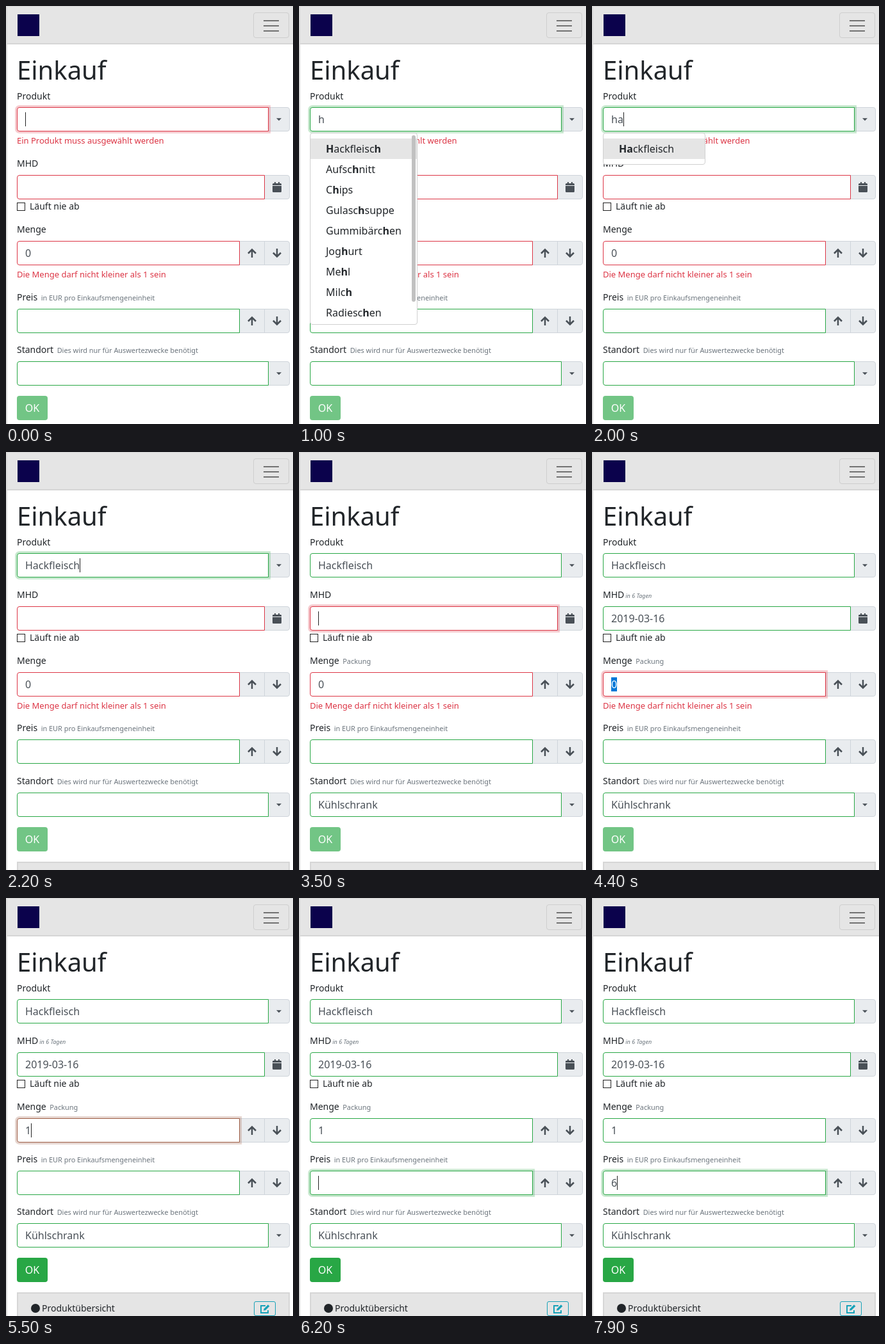
Recreate the animation shown at these times as an HTML page. Size 448x653 px, loop 8 s.

```html
<!DOCTYPE html>
<html lang="de">
<head>
<meta charset="utf-8">
<title>Einkauf</title>
<style>
  html, body { margin: 0; width: 100%; height: 100%; overflow: hidden; background: #fff; }
  body { position: relative; font: 14px/20px "Noto Sans", sans-serif; color: #212529; }
  div { box-sizing: border-box; }
  nav, nav div, .abs, .row, .row > * { position: absolute; white-space: nowrap; }
  nav { box-sizing: border-box; left: 0; top: 0; width: 448px; height: 60px; background: #e5e5e5;
    border: solid #d6d6d6; border-width: 1px 0 2px; }
  .edge { left: 0; top: 0; width: 2px; height: 653px; background: #dcdcdc; }
  .logo { left: 18px; top: 12px; width: 34px; height: 34px; background: #0b024c; }
  .menu { left: 386px; top: 9px; width: 56px; height: 40px; border: 1px solid #cecece; border-radius: 4px; }
  .menu div { left: 15px; width: 24px; height: 2px; background: #727272; }
  h1 { position: absolute; margin: 0; left: 17px; top: 76px; font: 400 40px/48px "Noto Sans", sans-serif; }
  .row { left: 17px; width: 426px; height: 38px; }
  .label { top: -28px; }
  .hint { font-size: 10.9px; color: #6c757d; margin-left: 5.5px; }
  .hint.days { font-size: 9px; font-style: italic; margin-left: 2px; }
  .field { left: 0; top: 0; height: 38px; padding-left: 12px; display: flex; align-items: center;
    background: #fff; border: 1px solid #28a745; border-radius: 4px 0 0 4px; z-index: 1;
    font-size: 16px; line-height: 22px; color: #495057; }
  .field i { width: 1px; height: 22px; background: #222; }
  .field .selected { background: #0078d7; color: #fff; }
  .addon { top: 0; height: 38px; background: #e9ecef; border: 1px solid #ced4da; }
  .addon:last-of-type { border-radius: 0 4px 4px 0; }
  .addon svg { position: absolute; left: 50%; top: 50%; margin: -8px; }
  .error { top: 42px; font-size: 13px; color: #dc3545; }
  .check { top: 43px; left: 0; width: 13px; height: 13px; border: 1px solid #222; background: #fff; }
  .never { top: 39px; left: 20px; }
  #ok { left: 17px; width: 48px; height: 38px; border-radius: 4px; background: #28a745; color: #fff;
    font-size: 16px; line-height: 38px; text-align: center; }
  #card { left: 17px; width: 426px; height: 80px; background: #e5e5e5; border: 2px solid #d6d6d6; }
  .dot { left: 20px; top: 16px; width: 14px; height: 14px; border-radius: 50%; background: #212529; }
  .edit { left: 368px; top: 12px; width: 34px; height: 23px; border: 1px solid #17a2b8; border-radius: 3px; }
  #list { left: 17px; top: 198px; min-width: 160px; max-height: 300px; padding: 8px 0; overflow: hidden;
    background: #fff; border: 1px solid #d0d0d0; border-radius: 4px; z-index: 5; font-size: 16px; line-height: 32px; }
  #list p { margin: 0; padding: 0 24px; }
  #list p:first-child { background: #e5e5e5; }
  #list b { font-weight: 700; }
  #list .bar { position: absolute; right: 2px; top: 3px; width: 6px; height: 260px; border-radius: 3px; background: #c1c1c1; }
</style>
</head>
<body>
<nav>
  <div class="logo"></div>
  <div class="menu"><div style="top:11px"></div><div style="top:19px"></div><div style="top:27px"></div></div>
</nav>
<div class="abs edge"></div>
<h1>Einkauf</h1>
<div id="form"></div>
<div class="abs" id="ok">OK</div>
<div class="abs" id="card">
  <div class="abs dot"></div>
  <div class="abs" style="left:37px;top:13px">Produktübersicht</div>
  <div class="abs edit"><svg class="abs" style="left:8px;top:3px" width="17" height="16" fill="none" stroke="#17a2b8" stroke-width="2">
    <path d="M9 3H2v11h11v-4"/><path d="M6 10.5l.6-2.8L13 1.3l2.4 2.4L9 10z" fill="#17a2b8" stroke="none"/></svg></div>
</div>
<div class="abs" id="list"></div>

<script>
const $ = id => document.getElementById(id);
const icon = body => `<svg width="16" height="16" fill="none" stroke="#495057" stroke-width="2.5">${body}</svg>`;
const ICONS = {
  caret: icon('<path d="M4 6.2h8l-4 4z" fill="#495057" stroke="none"/>'),
  up: icon('<path d="M8 15V3M2 8.5l6-6 6 6"/>'),
  down: icon('<path d="M8 1v12M2 7.5l6 6 6-6"/>'),
  calendar: icon('<path d="M1 5V3.5Q1 2 2.5 2H4V0h2v2h4V0h2v2h1.5Q15 2 15 3.5V5zM1 6h14v8.500Q15 16 13.500 16h-11Q1 16 1 14.500z" fill="#495057" stroke="none"/>')
};
const small = (text, cls = '') => `<span class="hint ${cls}">${text}</span>`;

// Tops are listed per layout stage: both errors shown, one error, none.
const ROWS = {
  product: { tops: [158, 158, 158], label: 'Produkt', icons: ['caret'], width: 393,
    extra: '<div class="error">Ein Produkt muss ausgewählt werden</div>' },
  date: { tops: [264, 241, 241], label: 'MHD' + small('in 6 Tagen', 'days'), icons: ['calendar'], width: 387,
    extra: '<div class="check"></div><div class="never">Läuft nie ab</div>' },
  amount: { tops: [367, 344, 344], label: 'Menge' + small('Packung'), icons: ['up', 'down'], width: 348,
    extra: '<div class="error">Die Menge darf nicht kleiner als 1 sein</div>' },
  price: { tops: [473, 449, 426], label: 'Preis' + small('in EUR pro Einkaufsmengeneinheit'), icons: ['up', 'down'], width: 348 },
  place: { tops: [555, 532, 508], label: 'Standort' + small('Dies wird nur für Auswertezwecke benötigt'), icons: ['caret'], width: 393 }
};
const OK_TOPS = [609, 586, 562], CARD_TOPS = [664, 640, 616];

for (const [id, row] of Object.entries(ROWS)) {
  const addonWidth = (426 - row.width) / row.icons.length;
  const addons = row.icons.map((name, i) =>
    `<div class="addon" style="left:${row.width - 1 + i * addonWidth}px;width:${addonWidth + 1}px">${ICONS[name]}</div>`).join('');
  // Addons sit in their own layer so that only the last one is rounded.
  $('form').insertAdjacentHTML('beforeend', `<div class="row" id="${id}">
    <span class="label">${row.label}</span>
    <div class="field" style="width:${row.width}px"><span></span><i></i></div>
    <section style="left:0;top:0">${addons.replace(/class="addon" style="/g, 'class="abs addon" style="')}</section>
    ${row.extra || ''}</div>`);
}
$('product').querySelector('.label').style.top = '-27px';

const PRODUCTS = ['Hackfleisch', 'Aufschnitt', 'Chips', 'Gulaschsuppe', 'Gummibärchen', 'Joghurt',
  'Mehl', 'Milch', 'Radieschen', 'Schinken'];

// text: field contents, valid: 0 red to 1 green, glow: focus ring strength.
const START = {
  stage: 0, caret: 'product', query: '', days: false, unit: false, selected: false,
  text: { amount: '0' },
  valid: { product: 0, date: 0, amount: 0, price: 1, place: 1 },
  glow: { product: 1 }
};
const STEPS = [
  [400, { caret: '' }],
  [900, { text: { product: 'h' }, valid: { product: .6 } }],
  [1000, { valid: { product: 1 }, query: 'h' }],
  [1100, { text: { product: 'ha' }, caret: 'product' }],
  [1200, { query: 'ha' }],
  [1500, { caret: '' }],
  [2000, { caret: 'product' }],
  [2200, { text: { product: 'Hackfleisch' }, query: '', stage: 1 }],
  [2500, { caret: 'date', glow: { product: .5, date: .5 }, unit: true, text: { place: 'Kühlschrank' } }],
  [2600, { glow: { product: 0, date: 1 } }],
  [3000, { caret: '' }],
  [3500, { caret: 'date' }],
  [3600, { text: { date: '0' } }],
  [3700, { text: { date: '03' } }],
  [3800, { text: { date: '031' } }],
  [3900, { text: { date: '2019-03-16' }, valid: { date: 1 } }],
  [4100, { days: true }],
  [4200, { caret: '', selected: true, glow: { date: .6, amount: .4 } }],
  [4300, { glow: { date: .1, amount: .9 } }],
  [4400, { glow: { date: 0, amount: 1 } }],
  [5500, { selected: false, text: { amount: '1' }, caret: 'amount', valid: { amount: .35 }, stage: 2 }],
  [5600, { valid: { amount: 1 } }],
  [5800, { caret: '' }],
  [6100, { caret: 'price', glow: { amount: .5, price: .5 } }],
  [6200, { glow: { amount: 0, price: 1 } }],
  [6600, { caret: '' }],
  [7100, { caret: 'price' }],
  [7700, { caret: '' }],
  [7900, { caret: 'price', text: { price: '6' } }]
];

const merge = (state, change) => {
  const next = { ...state, ...change };
  for (const key of ['text', 'valid', 'glow']) next[key] = { ...state[key], ...change[key] };
  return next;
};
const RED = [220, 53, 69], GREEN = [40, 167, 69];
const mix = v => RED.map((c, i) => Math.round(c + (GREEN[i] - c) * v)).join();
const show = (el, on) => { el.style.display = on ? '' : 'none'; };

function drawList(query) {
  show($('list'), query);
  if (!query) return;
  const match = new RegExp(query, 'gi');
  const hits = PRODUCTS.filter(name => name.toLowerCase().includes(query));
  $('list').innerHTML = hits.map(name => `<p>${name.replace(match, '<b>$&</b>')}</p>`).join('') +
    (hits.length > 9 ? '<div class="bar"></div>' : '');
}

function draw(s) {
  for (const [id, row] of Object.entries(ROWS)) {
    const el = $(id), field = el.querySelector('.field'), [text, caret] = field.children;
    const color = mix(s.valid[id]), glow = s.glow[id] || 0;
    el.style.top = row.tops[s.stage] + 'px';
    field.style.borderColor = `rgb(${color})`;
    field.style.boxShadow = glow ? `0 0 0 3px rgba(${color},${.25 * glow})` : 'none';
    text.textContent = s.text[id] || '';
    text.className = id === 'amount' && s.selected ? 'selected' : '';
    show(caret, s.caret === id);
  }
  show($('product').querySelector('.error'), s.stage < 1);
  show($('amount').querySelector('.error'), s.stage < 2);
  show($('date').querySelector('.hint'), s.days);
  show($('amount').querySelector('.hint'), s.unit);
  $('ok').style.top = OK_TOPS[s.stage] + 'px';
  $('ok').style.opacity = s.stage < 2 ? .65 : 1;
  $('card').style.top = CARD_TOPS[s.stage] + 'px';
  drawList(s.query);
}

const begin = performance.now();
let drawn = -1;
function tick() {
  const t = (performance.now() - begin) % 8000;
  const count = STEPS.filter(([at]) => at <= t).length;
  if (count !== drawn) {
    drawn = count;
    draw(STEPS.slice(0, count).reduce((s, [, change]) => merge(s, change), START));
  }
  requestAnimationFrame(tick);
}
tick();
</script>
</body>
</html>
```
